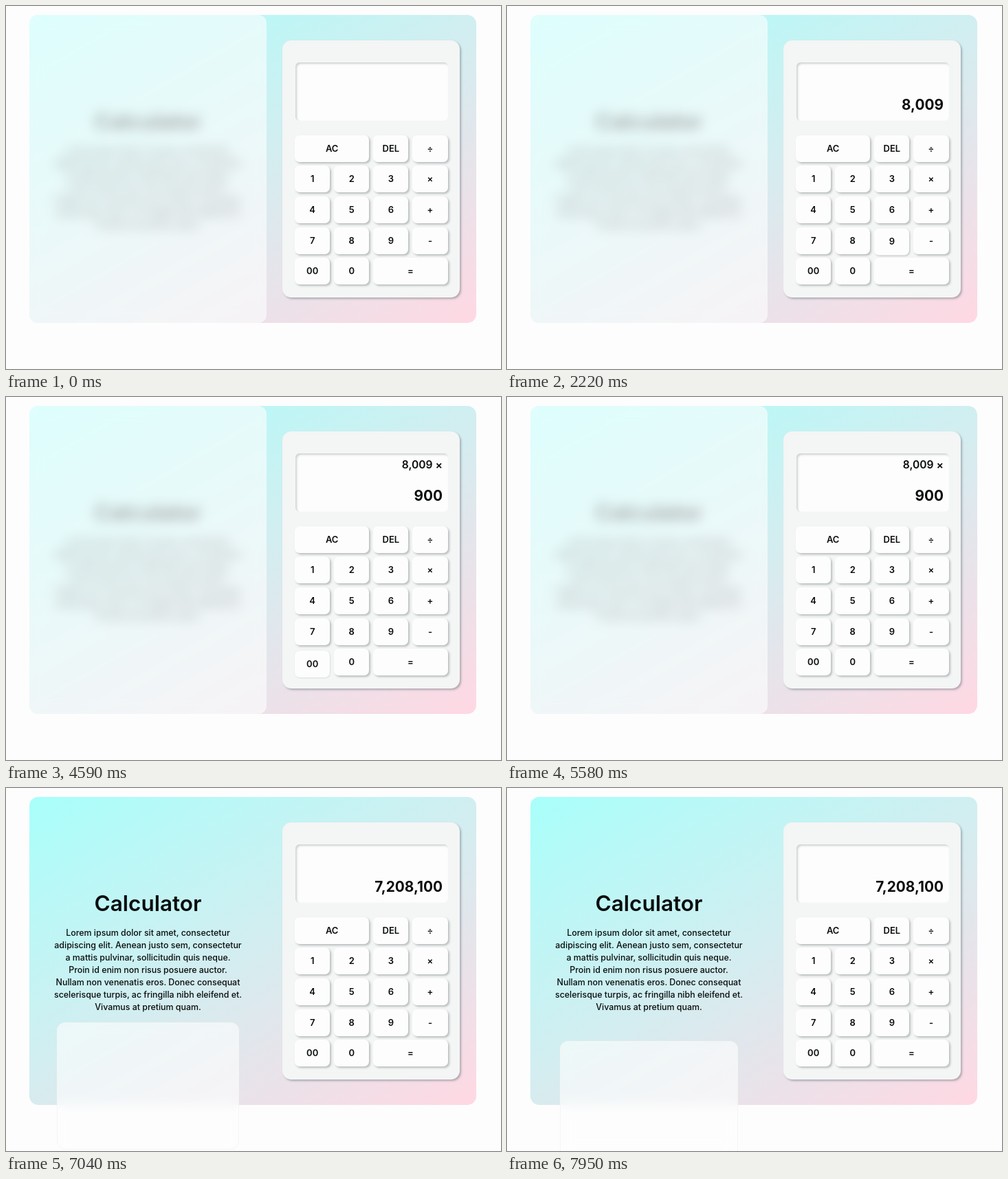
An HTML page that plays this animation: 720 px wide and 528 px high, repeating every 7.99 s.

```html
<!DOCTYPE html>
<html lang="en">
<head>
<meta charset="utf-8">
<title>Calculator</title>
<style>
  html, body { margin: 0; width: 100%; height: 100%; overflow: hidden; background: #fdfdfd; }
  #stage { position: relative; width: 720px; height: 528px; overflow: hidden; background: #fdfdfd;
    font-family: Inter, Roboto, sans-serif; color: #0a0d0d; }
  #stage div { position: absolute; box-sizing: border-box; white-space: pre; }
  .card { border-radius: 13px; background: linear-gradient(150deg, #a8fffb, #d4edf0 50%, #ffd8e3); }
  .title { font-size: 31.5px; font-weight: 600; text-align: center; }
  .line { font-size: 12.4px; font-weight: 500; text-align: center; }
  .body { border-radius: 13px; background: #f4f5f5; box-shadow: 2px 2px 3px rgba(90, 105, 110, .45); }
  .screen { border-radius: 6px; background: #fdfdfd; box-shadow: inset 2px 2px 3px rgba(150, 160, 160, .45); }
  .key { border-radius: 7px; background: #fdfdfd; font-size: 13px; font-weight: 600; text-align: center; }
  .prev { font-size: 15.6px; font-weight: 600; text-align: right; }
  .now { font-size: 20.8px; font-weight: 700; text-align: right; }
  .glass { border-radius: 12px; background: rgba(254, 254, 254, .62); backdrop-filter: blur(9px); }
  .rim { border: 1px solid #f3f5f3; border-radius: 12px; }
</style>
</head>
<body>
<div id="stage"></div>
<script>
const LOOP = 7990;
const stage = document.getElementById('stage');

function place(el, x, y, w, h) {
  Object.assign(el.style, { left: x + 'px', top: y + 'px', width: w + 'px', height: h + 'px' });
}

function box(cls, x, y, w, h, text = '') {
  const el = document.createElement('div');
  el.className = cls;
  el.textContent = text;
  el.style.lineHeight = h + 'px';
  place(el, x, y, w, h);
  stage.appendChild(el);
  return el;
}

const copy = [
  'Lorem ipsum dolor sit amet, consectetur',
  'adipiscing elit. Aenean justo sem, consectetur',
  'a mattis pulvinar, sollicitudin quis neque.',
  'Proin id enim non risus posuere auctor.',
  'Nullam non venenatis eros. Donec consequat',
  'scelerisque turpis, ac fringilla nibh eleifend et.',
  'Vivamus at pretium quam.'
];

box('card', 34, 13, 650, 448);
box('title', 34, 148, 345, 40, 'Calculator');
copy.forEach((s, i) => box('line', 34, 202 + i * 18, 345, 18, s));

const glass = box('glass', 34, 13, 344.5, 448);
const rim = box('rim', 34, 13, 344.5, 448);

box('body', 402, 50, 258, 374);
box('screen', 420.5, 81.5, 222, 85.5);
const prev = box('prev', 430, 88, 205, 22);
const now = box('now', 430, 129, 205, 30);

const keys = {};
const rows = [['AC:2', 'DEL', '÷'], ['1', '2', '3', '×'], ['4', '5', '6', '+'], ['7', '8', '9', '-'], ['00', '0', '=:2']];
rows.forEach((row, r) => {
  let col = 0;
  for (const item of row) {
    const [name, span = 1] = item.split(':');
    keys[name] = box('key', 420 + col * 57.1, 187.5 + r * 44.7, 51.3 + (span - 1) * 57.1, 39, name);
    col += +span;
  }
});

// key, time of entry, time of release, upper line, main line
const steps = [
  ['8', 600, 610, '', '8'],
  ['00', 1390, 1400, '', '800'],
  ['9', 2160, 2160, '', '8,009'],
  ['×', 2990, 3000, '8,009 ×', ''],
  ['9', 3790, 3800, '8,009 ×', '9'],
  ['00', 4590, 4780, '8,009 ×', '900'],
  ['=', 5690, 5700, '', '7,208,100']
];

const clamp = v => Math.max(0, Math.min(1, v));
const press = (t, at, end) => Math.min(clamp((t - at + 100) / 100), clamp((end + 120 - t) / 120));
const settle = (t, k) => 1 - Math.exp(-t / k);
const softSettle = (t, k) => 1 - (1 + t / k) * Math.exp(-t / k);

function drawKeys(t) {
  const down = {};
  let top = '', main = '';
  for (const [name, at, end, a, b] of steps) {
    down[name] = Math.max(down[name] || 0, press(t, at, end));
    if (t >= at) [top, main] = [a, b];
  }
  prev.textContent = top;
  now.textContent = main;
  for (const name in keys) {
    const d = down[name] || 0, s = 2 - 1.5 * d;
    keys[name].style.transform = d ? `translateY(${3 * d}px)` : 'none';
    keys[name].style.boxShadow = `${s}px ${s}px ${1 + s}px rgba(110,120,125,${.45 - .15 * d})`;
  }
}

// The frosted panel drops and shrinks off the text
function drawGlass(t) {
  const u = Math.max(0, t - 6140);
  const side = 42.7 * softSettle(u, 210);
  const y = 13 + 357 * settle(u, 357);
  const bottom = 461 + 80 * settle(u, 544);
  for (const el of [glass, rim]) place(el, 34 + side, y, 344.5 - 2 * side, bottom - y);
  rim.style.opacity = softSettle(u, 210);
}

function frame() {
  const t = performance.now() % LOOP;
  drawKeys(t);
  drawGlass(t);
  requestAnimationFrame(frame);
}
frame();
</script>
</body>
</html>
```
